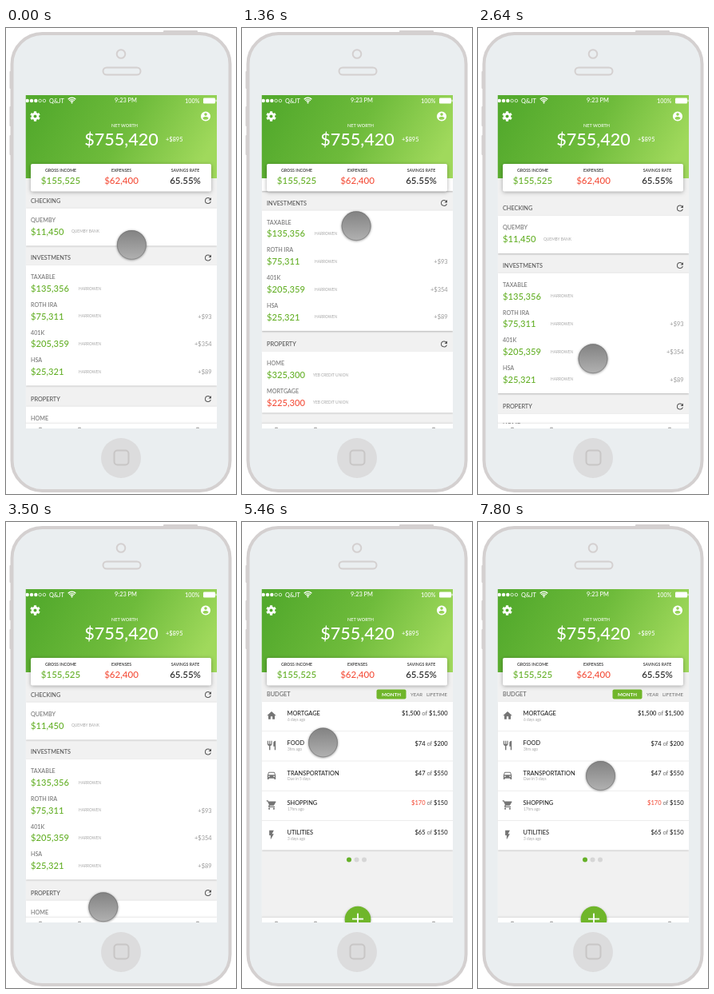
An HTML page with a canvas for the animation above (8 s loop, 288x583 px).

```html
<!DOCTYPE html>
<html lang="en">
<head>
<meta charset="utf-8">
<title>Budget app</title>
<style>
html, body { margin: 0; width: 100%; height: 100%; overflow: hidden; background: #fff; }
canvas { display: block; width: 288px; height: 583px; }
</style>
</head>
<body>
<canvas id="stage"></canvas>
<script>
const W = 288, H = 583, LOOP = 8000;
const canvas = document.getElementById('stage');
const g = canvas.getContext('2d');
const dpr = window.devicePixelRatio || 1;
canvas.width = W * dpr;
canvas.height = H * dpr;

const GREEN = '#65b028', RED = '#f4503c', INK = '#222', GREY = '#757575', PALE = '#a6a6a6', PAGE = '#f1f1f1';
const SCREEN = { x: 24.5, y: 84, w: 239.5, h: 417 };
const HEAD_Y = 188, TAB_Y = 495;

const ICONS = {
  refresh: 'M17.65 6.35A7.95 7.95 0 0 0 12 4a8 8 0 1 0 7.73 10h-2.08A6 6 0 1 1 12 6c1.66 0 3.14.69 4.22 1.78L13 11h7V4z',
  person: 'M12 2a10 10 0 1 0 0 20a10 10 0 0 0 0-20zm0 3a3 3 0 1 1 0 6a3 3 0 0 1 0-6zm0 14.2c-2.5 0-4.7-1.3-6-3.2c0-2 4-3.1 6-3.1s6 1.1 6 3.1a7.2 7.2 0 0 1-6 3.2z',
  home: 'M10 20v-6h4v6h5v-8h3L12 3 2 12h3v8z',
  food: 'M11 9H9V2H7v7H5V2H3v7c0 2.1 1.7 3.8 3.75 4V22h2.5v-9C11.3 12.8 13 11.1 13 9V2h-2zm5-3v8h2.5v8H21V2c-2.8 0-5 2.2-5 4z',
  car: 'M18.9 6c-.2-.6-.8-1-1.4-1h-11c-.7 0-1.2.4-1.4 1L3 12v9h3v-2h12v2h3v-9zM6.5 16a1.5 1.5 0 1 1 0-3a1.5 1.5 0 0 1 0 3zm11 0a1.5 1.5 0 1 1 0-3a1.5 1.5 0 0 1 0 3zM5 11l1.5-4.5h11L19 11z',
  cart: 'M7 18a2 2 0 1 0 0 4a2 2 0 0 0 0-4zM1 2v2h2l3.6 7.6-1.35 2.4C4.5 15.4 5.5 17 7 17h12v-2H7.4l1.1-2H16c.75 0 1.4-.4 1.75-1L21.7 5a1 1 0 0 0-.9-1H5.2l-.9-2zM17 18a2 2 0 1 0 0 4a2 2 0 0 0 0-4z',
  bolt: 'M7 2v11h3v9l7-12h-4l4-8z'
};
for (const k in ICONS) ICONS[k] = new Path2D(ICONS[k]);

const SECTIONS = [
  { title: 'CHECKING', y: 216, top: 225.5, bottom: 272.5, subX: 82,
    rows: [['QUEMBY', '$11,450', 'QUEMBY BANK']] },
  { title: 'INVESTMENTS', y: 287.5, top: 297, bottom: 447.5, subX: 91,
    rows: [['TAXABLE', '$135,356', 'HARROWEN'], ['ROTH IRA', '$75,311', 'HARROWEN', '+$93'],
           ['401K', '$205,359', 'HARROWEN', '+$354'], ['HSA', '$25,321', 'HARROWEN', '+$89']] },
  { title: 'PROPERTY', y: 464, top: 473.5, bottom: 550, subX: 89,
    rows: [['HOME', '$325,300', 'YEB CREDIT UNION'], ['MORTGAGE', '$225,300', 'YEB CREDIT UNION', '', RED]] }
];

const BUDGET = [
  ['home', 'MORTGAGE', '6 days ago', '$1,500', '$1,500'],
  ['food', 'FOOD', '3hrs ago', '$74', '$200'],
  ['car', 'TRANSPORTATION', 'Due in 5 days', '$47', '$550'],
  ['cart', 'SHOPPING', '17hrs ago', '$170', '$150', RED],
  ['bolt', 'UTILITIES', '3 days ago', '$65', '$150']
];

// --- timing ---
const linear = u => u;
const easeOut = u => 1 - (1 - u) ** 3;
const easeInOut = u => u * u * (3 - 2 * u);

function pageEase(u) { // cubic-bezier(.36, .66, .04, 1)
  let lo = 0, hi = 1;
  for (let i = 0; i < 24; i++) {
    const s = (lo + hi) / 2, r = 1 - s;
    if (3 * r * r * s * 0.36 + 3 * r * s * s * 0.04 + s ** 3 < u) lo = s; else hi = s;
  }
  const r = 1 - lo;
  return 3 * r * r * lo * 0.66 + 3 * r * lo * lo + lo ** 3;
}

// keys: [time, values, ease into this key]
function track(keys, t) {
  const next = keys.findIndex(key => t < key[0]);
  if (next === 0) return keys[0][1];
  if (next < 0) return keys[keys.length - 1][1];
  const [t0, from] = keys[next - 1];
  const [t1, to, ease = linear] = keys[next];
  const u = ease((t - t0) / (t1 - t0));
  return from.map((v, i) => v + (to[i] - v) * u);
}

const TOUCH = [
  [0, [157.5, 271.5]], [40, [150.5, 268.5]],
  [385, [150.5, 268.5]], [500, [142.5, 336.5]],
  [785, [142.5, 336.5]], [1000, [143, 288.5]], [1300, [143, 246], easeOut],
  [1600, [143.5, 262], easeInOut], [1840, [144, 298]], [2640, [144, 413.5]],
  [2980, [144, 440], easeOut], [3250, [144, 440]], [3680, [108.5, 507], easeInOut],
  [4665, [108.5, 507]], [5460, [101.5, 276], easeInOut],
  [6725, [101.5, 276]], [7040, [120, 280], easeInOut],
  [7625, [120.5, 280.5]], [7800, [153.5, 317.5]]
];
const SCROLL = [
  [800, [0]], [1000, [39]], [1280, [69], easeOut], [1600, [66.5], easeInOut],
  [1910, [66.5]], [2390, [0]], [2640, [-9.5]], [2980, [-14], easeOut],
  [3060, [-14]], [3480, [0], easeOut]
];
const SLIDE = [[3960, [0]], [4460, [1], pageEase]];
const EXPAND = [[5865, [0]], [6040, [75], easeInOut], [7285, [75]], [7420, [0], easeInOut]];

// --- drawing helpers ---
function text(s, x, y, size, color, align = 'left', weight = 500) {
  g.font = `${weight} ${size}px Lato, "Open Sans", sans-serif`;
  g.textAlign = align;
  g.fillStyle = color;
  g.fillText(s, x, y + size * 0.36);
  return g.measureText(s).width;
}

function rect(x, y, w, h, color) {
  g.fillStyle = color;
  g.fillRect(x, y, w, h);
}

function pill(x, y, w, h, r, color) {
  g.beginPath();
  g.roundRect(x, y, w, h, r);
  g.fillStyle = color;
  g.fill();
}

function outline(x, y, w, h, r, width, color) {
  g.beginPath();
  g.roundRect(x, y, w, h, r);
  g.lineWidth = width;
  g.strokeStyle = color;
  g.stroke();
}

function dot(x, y, r, color) {
  g.beginPath();
  g.arc(x, y, r, 0, Math.PI * 2);
  g.fillStyle = color;
  g.fill();
}

function shadowed(blur, dy, alpha, draw) {
  g.save();
  g.shadowColor = `rgba(0,0,0,${alpha})`;
  g.shadowBlur = blur * dpr;
  g.shadowOffsetY = dy * dpr;
  draw();
  g.restore();
}

function icon(name, x, y, size, color) {
  g.save();
  g.translate(x - size / 2, y - size / 2);
  g.scale(size / 24, size / 24);
  g.fillStyle = color;
  g.fill(ICONS[name], 'evenodd');
  g.restore();
}

function clipped(x, y, w, h, draw) {
  g.save();
  g.beginPath();
  g.rect(x, y, w, h);
  g.clip();
  draw();
  g.restore();
}

function shifted(x, y, draw) {
  g.save();
  g.translate(x, y);
  draw();
  g.restore();
}

function card(top, bottom) {
  shadowed(2, 0.8, 0.25, () => rect(SCREEN.x, top, SCREEN.w, bottom - top, '#fff'));
}

// --- scene parts ---
function phone() {
  const edge = '#d4d0d0', soft = '#dcdcdd';
  rect(0, 0, W, H, '#fff');
  for (const [y, h] of [[54, 22], [98, 25], [134, 25]]) pill(4.5, y, 4, h, 1, edge);
  pill(197, 3, 43, 4, 1, edge);
  pill(7.5, 7, 273, 572, 38, '#eaeef0');
  outline(7.5, 7, 273, 572, 38, 4, edge);
  outline(138.7, 27.2, 10.6, 10.6, 5.3, 2, edge);
  outline(121.5, 49.5, 47, 9, 4.5, 2, edge);
  dot(144, 538, 25, soft);
  outline(135.5, 528.5, 18, 18, 4, 2, '#c8c6c6');
}

function gear(x, y) {
  g.save();
  g.translate(x, y);
  for (let i = 0; i < 6; i++) {
    g.rotate(Math.PI / 3);
    rect(-1.6, -6.2, 3.2, 4, '#fff');
  }
  g.beginPath();
  g.arc(0, 0, 3.4, 0, Math.PI * 2);
  g.lineWidth = 2.6;
  g.strokeStyle = '#fff';
  g.stroke();
  g.restore();
}

function statusBar() {
  for (let i = 0; i < 5; i++) {
    g.beginPath();
    g.arc(26.7 + i * 5.3, 91, i < 3 ? 2.2 : 1.8, 0, Math.PI * 2);
    g.fillStyle = g.strokeStyle = '#fff';
    g.lineWidth = 0.7;
    if (i < 3) g.fill(); else g.stroke();
  }
  text('Q&JT', 54, 91, 7.4, '#fff');
  g.lineWidth = 1.3;
  for (const r of [2.6, 4.7, 6.8]) {
    g.beginPath();
    g.arc(82.5, 94, r, -Math.PI * 0.75, -Math.PI * 0.25);
    g.stroke();
  }
  dot(82.5, 93.4, 1, '#fff');
  text('9:23 PM', 150, 90.5, 7.4, '#fff', 'center');
  text('100%', 242.5, 91, 7.3, '#fff', 'right');
  pill(247, 87.5, 15, 7, 1.3, '#fff');
  rect(262.5, 89.7, 1, 2.6, '#fff');
}

function header() {
  const fill = g.createLinearGradient(50, 83, 235, 187);
  fill.addColorStop(0, '#54aa2d');
  fill.addColorStop(0.5, '#6ebb3b');
  fill.addColorStop(1, '#a0d95c');
  rect(SCREEN.x, SCREEN.y, SCREEN.w, HEAD_Y - SCREEN.y, fill);
  statusBar();
  gear(36.5, 110.5);
  icon('person', 250, 110.5, 14.5, '#fff');
  text('NET WORTH', 148.5, 122.5, 5.5, '#fff', 'center');
  text('$755,420', 144.5, 139, 21.6, '#fff', 'center');
  text('+$895', 200, 139, 7.4, '#fff');
  shadowed(5, 1, 0.32, () => pill(31, 170, 226, 34.5, 2, '#fff'));
  const stats = [['GROSS INCOME', '$155,525', 68.5, GREEN], ['EXPENSES', '$62,400', 144.5, RED], ['SAVINGS RATE', '65.55%', 224.5, INK]];
  for (const [label, value, x, color] of stats) {
    text(label, x, 178.5, 5.2, INK, 'center');
    text(value, x, 191, 11.5, color, 'center');
  }
}

function accounts() {
  for (const s of SECTIONS) {
    card(s.top, s.bottom);
    text(s.title, 31, s.y, 7.3, '#555');
    icon('refresh', 253, s.y, 12, '#555');
    s.rows.forEach(([name, value, sub, gain, color], i) => {
      const y = s.top + 14.7 + i * 34.7;
      text(name, 31, y, 7.2, GREY);
      text(value, 31, y + 14.3, 11.2, color || GREEN);
      text(sub, s.subX, y + 14.3, 4.8, PALE, 'left', 400);
      if (gain) text(gain, 257.5, y + 14.5, 7.4, '#999', 'right', 400);
    });
  }
}

function budget(open) {
  const pitch = 37.3, top = 225;
  text('BUDGET', 31, 215.5, 7.3, '#666');
  pill(168.5, 209.5, 37, 12, 2, '#70b62b');
  text('MONTH', 187, 215.5, 6.2, '#fff', 'center', 700);
  text('YEAR', 218.5, 215.5, 6, GREY, 'center');
  text('LIFETIME', 257, 215.5, 6, GREY, 'right');
  card(top, top + 5 * pitch - 1 + open);
  BUDGET.forEach(([pic, name, when, spent, total, color], i) => {
    const y = top + 14.5 + i * pitch + (i > 1 ? open : 0);
    if (i) rect(SCREEN.x, y - 15.5, SCREEN.w, 0.8, '#e8e8e8');
    icon(pic, 37, y + 2.7, 13.8, GREY);
    text(name, 56.5, y, 7.4, INK);
    text(when, 57, y + 7.5, 4.8, PALE, 'left', 400);
    let x = 257.5;
    x -= text(total, x, y, 7.5, INK, 'right');
    x -= text(' of ', x, y, 7.5, GREY, 'right');
    text(spent, x, y, 7.5, color || INK, 'right');
  });
  [134, 143.5, 153].forEach((x, i) => dot(x, 422.5 + open, 3, i ? '#d6d6d6' : GREEN));
}

function tabBar() {
  shadowed(2, -0.5, 0.15, () => rect(SCREEN.x, TAB_Y, SCREEN.w, 6, '#fff'));
  for (const x of [43, 92, 240]) pill(x - 2, 499.5, 4, 3, 1, '#b5b5b5');
}

function addButton() {
  shadowed(3, 1, 0.35, () => dot(145, 497, 16.3, '#6fb62a'));
  rect(138, 495.7, 14, 1.8, '#fff');
  rect(144.1, 489.6, 1.8, 14, '#fff');
}

function touch(x, y) {
  const fill = g.createLinearGradient(0, y - 18, 0, y + 18);
  fill.addColorStop(0, 'rgba(130,130,130,.96)');
  fill.addColorStop(1, 'rgba(178,178,178,.96)');
  shadowed(3, 0.5, 0.45, () => dot(x, y, 18.5, fill));
  g.beginPath();
  g.arc(x, y, 17.9, 0, Math.PI * 2);
  g.lineWidth = 1;
  g.strokeStyle = 'rgba(110,110,110,.55)';
  g.stroke();
}

function render(t) {
  const [scroll] = track(SCROLL, t);
  const [slide] = track(SLIDE, t);
  const [open] = track(EXPAND, t);
  const enterX = SCREEN.w * (1 - slide);

  g.setTransform(dpr, 0, 0, dpr, 0, 0);
  phone();
  clipped(SCREEN.x, SCREEN.y, SCREEN.w, SCREEN.h, () => {
    rect(SCREEN.x, SCREEN.y, SCREEN.w, SCREEN.h, PAGE);
    clipped(SCREEN.x, HEAD_Y, SCREEN.w, TAB_Y - HEAD_Y, () => {
      if (slide < 1) shifted(-SCREEN.w * 0.33 * slide, -scroll, accounts);
      if (slide > 0) shifted(enterX, 0, () => {
        rect(SCREEN.x, HEAD_Y, SCREEN.w, TAB_Y - HEAD_Y, PAGE);
        budget(open);
      });
    });
    header();
    tabBar();
    if (slide > 0) shifted(enterX, 0, addButton);
    touch(...track(TOUCH, t));
  });
}

const start = performance.now();
function tick() {
  render((performance.now() - start) % LOOP);
  requestAnimationFrame(tick);
}
tick();
</script>
</body>
</html>
```
